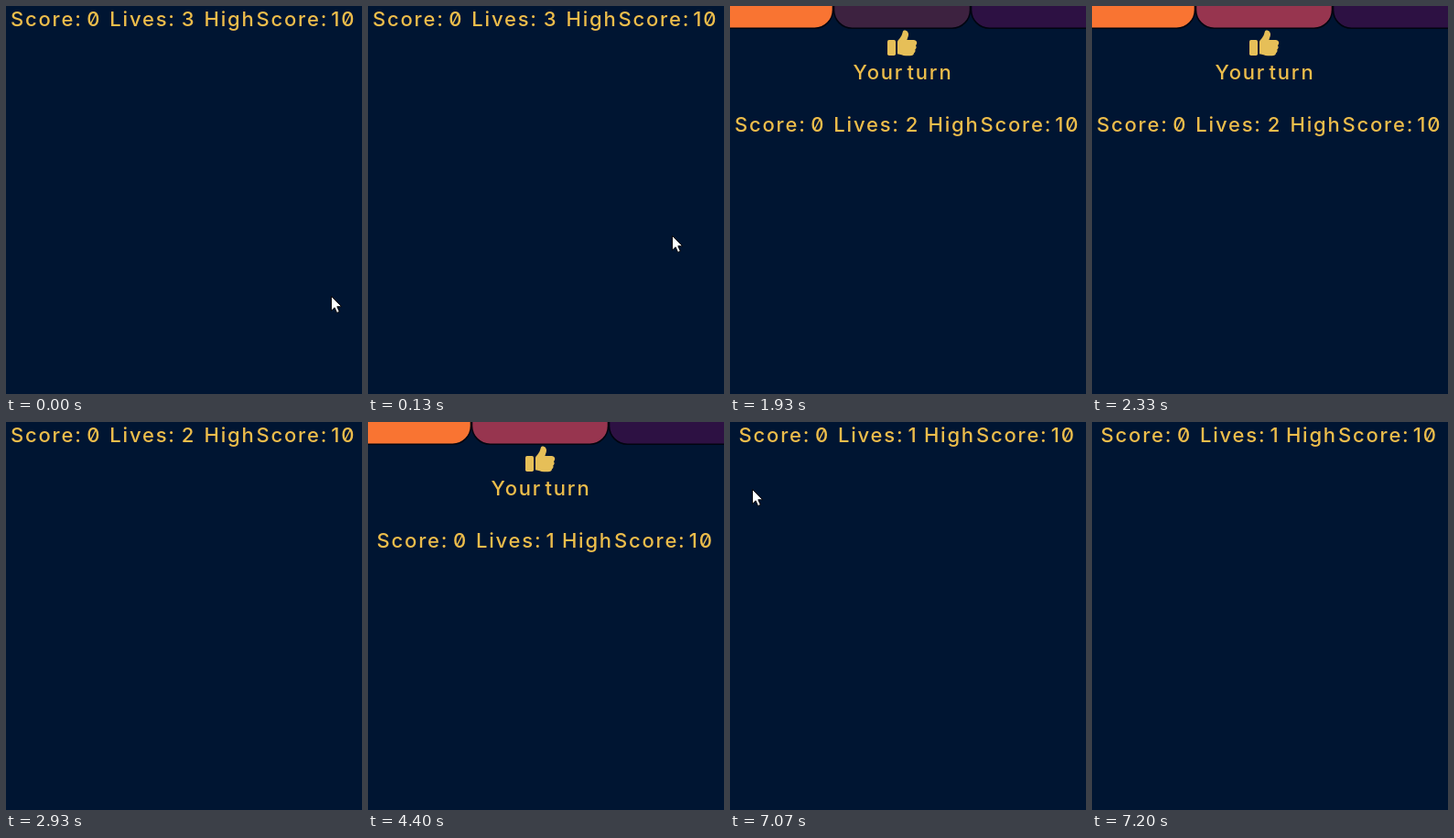
Recreate the animation shown at these times as an HTML page. Size 389x423 px, loop 7.74 s.

```html
<!DOCTYPE html>
<html lang="en">
<head>
<meta charset="utf-8">
<title>Memory game</title>
<style>
  html, body { margin: 0; width: 100%; height: 100%; overflow: hidden; background: #001532; }
  svg { display: block; width: 389px; height: 423px; }
  text {
    font: 500 22px Inter, sans-serif;
    font-feature-settings: "zero";
    letter-spacing: 1.8px;
    fill: #edbd4b;
    white-space: pre;
  }
  .tile { stroke: #000510; stroke-width: 1.6; }
</style>
</head>
<body>
<svg viewBox="0 0 389 423">
  <rect width="389" height="423" fill="#001532"/>
  <g id="board">
    <rect class="tile" x="-37" y="-120" width="149.5" height="144.2" rx="20" fill="#f97432"/>
    <rect class="tile" id="middle" x="113.5" y="-120" width="149" height="144.2" rx="20"/>
    <rect class="tile" x="263.5" y="-120" width="149" height="144.2" rx="20" fill="#2d1143"/>
    <g fill="#e6bf58">
      <rect x="172" y="37" width="9" height="17" rx="1.7"/>
      <path d="M183 39.2 C183 37.8 184.2 36.8 185.3 35.5 C188.2 32 188 30.5 189 27.6
        C189.5 26 192.5 26 194 28 C196.3 31 194.2 34 193.4 37 H200.6
        C204.6 37 205.2 41.2 202.9 43 C204.2 44.6 203.7 46.5 202.3 47.5
        C203 49.4 202 50.7 201 51.2 C201.2 53.2 199.2 54.2 196.7 54.2 H192
        C188.7 54.2 186.2 52.4 183 52.2 Z"/>
    </g>
    <text x="134.5" y="80">Your</text>
    <text x="193.5" y="80">turn</text>
  </g>
  <g id="stats">
    <g id="left">
      <text x="5" y="22">Score:</text>
      <text x="88.3" y="22">0</text>
      <text x="113.3" y="22">Lives:</text>
      <text id="lives" x="191.8" y="22">3</text>
    </g>
    <g id="right">
      <text x="216.5" y="22">High</text>
      <text x="273.5" y="22">Score:</text>
      <text x="355.3" y="22">10</text>
    </g>
  </g>
  <path id="cursor" d="M.5 .5 V16.2 L4.1 12.8 L6.6 18.5 L9.3 17.3 L6.8 11.7 H11.7 Z"
    fill="#fff" stroke="#000" stroke-width=".9"/>
</svg>
<script>
const LOOP = 7740;
const el = id => document.getElementById(id);
const [board, middle, stats, left, right, lives, cursor] =
  ["board", "middle", "stats", "left", "right", "lives", "cursor"].map(el);

// Pointer positions, each held from its start time; null hides the pointer.
const pointer = [
  [0, [355, 316]], [70, [332, 250]], [137, [298, 152]], [203, [263, 54]], [270, null],
  [7070, [24, 73]], [7135, [116, 270]], [7200, null]
];

const show = (node, on) => node.setAttribute("display", on ? "inline" : "none");
const move = (node, x, y) => node.setAttribute("transform", `translate(${x} ${y})`);
const within = (t, from, to) => t >= from && t < to;

function draw(t) {
  const boardVisible = within(t, 1930, 2930) || within(t, 4400, 5400);
  const count = t < 1930 ? 3 : t < 4400 ? 2 : 1;
  const inset = count === 1 ? 4.6 : 0;

  show(board, boardVisible);
  middle.setAttribute("fill", t < 2330 ? "#3d2240" : "#97354f");
  move(stats, 0, boardVisible ? 115 : 0);
  move(left, inset, 0);
  move(right, -inset, 0);
  lives.textContent = count;
  lives.setAttribute("x", count === 1 ? 190 : 191.8);

  const spot = pointer.findLast(([start]) => t >= start)[1];
  show(cursor, spot);
  if (spot) move(cursor, ...spot);
}

const started = performance.now();
function tick() {
  draw((performance.now() - started) % LOOP);
  requestAnimationFrame(tick);
}
tick();
</script>
</body>
</html>
```
